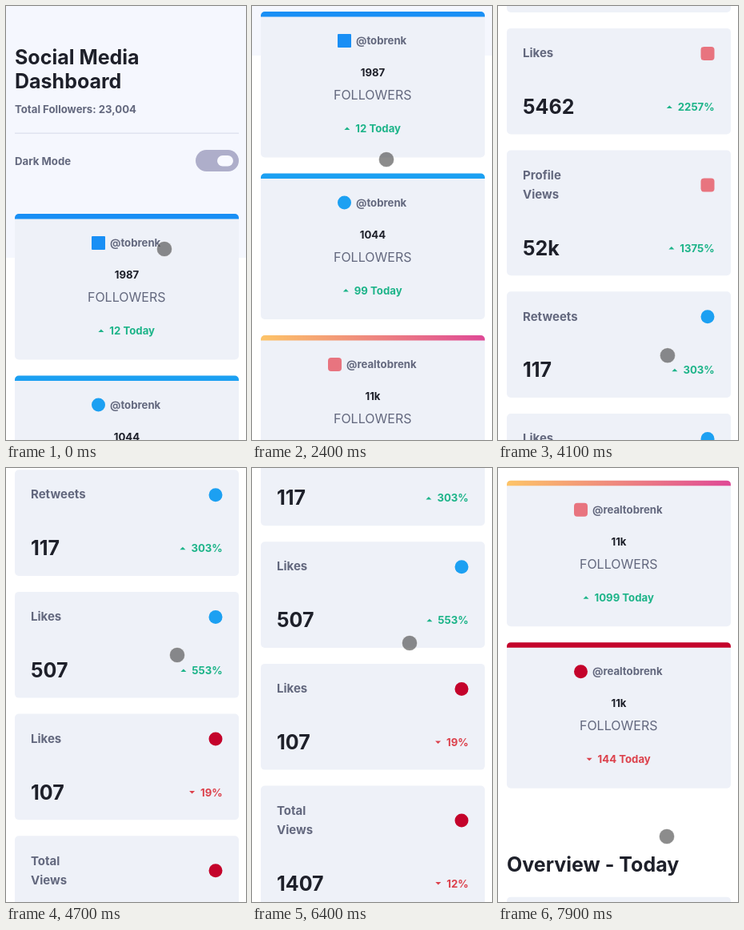
An HTML page for the animation above (8000 ms loop, 300 by 543 pixels).

```html
<!DOCTYPE html>
<html lang="en">
<head>
<meta charset="utf-8">
<title>Social Media Dashboard</title>
<style>
  html, body { margin: 0; width: 100%; height: 100%; overflow: hidden; background: #fff; }
  svg { display: block; width: 300px; height: 543px; font-family: Inter, sans-serif; }
  text { font-size: 13.2px; font-weight: 700; fill: #63687e; }
  .title { font-size: 25px; fill: #1e202a; }
  .dark { fill: #1e202a; }
  .label { font-size: 15px; }
  .caption { font-size: 16px; font-weight: 400; }
  .up { fill: #1db489; }
  .down { fill: #dc414c; }
</style>
</head>
<body>
<svg viewBox="0 0 300 543">
  <defs>
    <linearGradient id="sunset">
      <stop stop-color="#fdc468"/>
      <stop offset="1" stop-color="#df4996"/>
    </linearGradient>
  </defs>
  <g id="page">
    <rect width="300" height="315" fill="#f5f7fe"/>
    <text class="title" x="11" y="73">Social Media</text>
    <text class="title" x="11" y="103">Dashboard</text>
    <text x="11" y="134">Total Followers: 23,004</text>
    <rect x="11" y="158.5" width="280" height="1.5" fill="#e0e3f0"/>
    <text x="11" y="199">Dark Mode</text>
    <rect x="237" y="180" width="54" height="27" rx="13.5" fill="#aeaeca"/>
    <rect x="264" y="187" width="20" height="13.5" rx="6.75" fill="#f8f9ff"/>
    <text class="title" x="11" y="1154">Overview - Today</text>
  </g>
  <circle id="cursor" r="9.6" fill="rgba(80,80,80,.66)" stroke="rgba(255,255,255,.5)"/>
</svg>
<script>
(() => {
  const page = document.getElementById('page');
  const cursor = document.getElementById('cursor');

  function add(tag, attrs, content = '') {
    const node = document.createElementNS('http://www.w3.org/2000/svg', tag);
    for (const key in attrs) node.setAttribute(key, attrs[key]);
    node.textContent = content;
    page.append(node);
    return node;
  }

  const write = (content, x, y, cls = '', anchor = 'start') =>
    add('text', { x, y, class: cls, 'text-anchor': anchor }, content);

  const networks = {
    blue: { color: '#198ff5', round: 1 },
    sky: { color: '#1ca0f2', round: 8.5 },
    pink: { color: '#e8747f', bar: 'url(#sunset)', round: 4 },
    red: { color: '#c4032b', round: 8.5 }
  };

  function badge(network, cx, cy) {
    const { color, round } = networks[network];
    add('rect', { x: cx - 8.5, y: cy - 8.5, width: 17, height: 17, rx: round, fill: color });
  }

  const panel = (y, height) =>
    add('rect', { x: 11, y, width: 280, height, rx: 5, fill: '#eef1f8' });

  // Text with a small triangle on its left; align 0.5 centres the pair on x, 1 ends it there.
  function trend(content, direction, x, y, align) {
    const gap = 14;
    const label = write(content, 0, y, direction);
    const left = x - (label.getComputedTextLength() + gap) * align;
    label.setAttribute('x', left + gap);
    const shape = direction === 'up' ? `M${left} ${y - 3}h7l-3.5 -3.5z` : `M${left} ${y - 6.5}h7l-3.5 3.5z`;
    add('path', { d: shape, class: direction });
  }

  function followerCard(y, network, handle, count, change, direction) {
    const left = handle.length > 8 ? 118 : 130;
    const { color, bar = color } = networks[network];
    panel(y, 182.5);
    add('path', { d: `M11 ${y + 6.5}v-1.5a5 5 0 0 1 5 -5h270a5 5 0 0 1 5 5v1.5z`, fill: bar });
    badge(network, left - 14.5, y + 36.5);
    write(handle, left, y + 41);
    write(count, 151, y + 81, 'dark', 'middle');
    write('FOLLOWERS', 150.7, y + 110, 'caption', 'middle');
    trend(change, direction, 150.7, y + 151, 0.5);
  }

  // Returns the card's height: each further word of the name takes one more line.
  function overviewCard(y, name, network, count, change, direction) {
    const lines = name.split(' ');
    const extra = (lines.length - 1) * 24;
    panel(y, 132.7 + extra);
    lines.forEach((line, i) => write(line, 31, y + 36.3 + i * 24, 'label'));
    badge(network, 262, y + 31.5 + extra / 2);
    write(count, 31, y + 107 + extra, 'title');
    trend(change, direction, 270.7, y + 103 + extra, 1);
    return 132.7 + extra;
  }

  [
    ['blue', '@tobrenk', '1987', '12 Today', 'up'],
    ['sky', '@tobrenk', '1044', '99 Today', 'up'],
    ['pink', '@realtobrenk', '11k', '1099 Today', 'up'],
    ['red', '@realtobrenk', '11k', '144 Today', 'down']
  ].forEach((card, i) => followerCard(260 + i * 202.5, ...card));

  [
    ['Page Views', 'blue', '87', '3%', 'up'],
    ['Likes', 'blue', '52', '2%', 'down'],
    ['Likes', 'pink', '5462', '2257%', 'up'],
    ['Profile Views', 'pink', '52k', '1375%', 'up'],
    ['Retweets', 'sky', '117', '303%', 'up'],
    ['Likes', 'sky', '507', '553%', 'up'],
    ['Likes', 'red', '107', '19%', 'down'],
    ['Total Views', 'red', '1407', '12%', 'down']
  ].reduce((y, card) => y + overviewCard(y, ...card) + 20, 1186);

  // A swipe drags the page from one point to another; after release the page glides on.
  const swipe = (press, release, from, to, glide) => ({ press, release, from, to, glide });
  const rest = { release: 200, to: [198, 304] };
  const swipes = [
    swipe(1800, 2400, [156, 467], [168, 192], 209),
    swipe(3100, 3600, [196, 440], [210, 215], 1010),
    swipe(4250, 4700, [212, 440], [214, 234], 37),
    swipe(6400, 6700, [197, 219], [205, 440], -856),
    swipe(7450, 7900, [200, 230], [211, 461], -150)
  ];
  const dragRatio = 0.92, glideTime = 300;

  const progress = (t, from, to) => Math.min(1, Math.max(0, (t - from) / (to - from)));
  const smooth = p => p * p * (3 - 2 * p);
  const settle = p => 1 - (1 - p) ** 3;
  const mix = (a, b, p) => a.map((value, i) => value + (b[i] - value) * p);

  function scrollAt(t) {
    return swipes.reduce((sum, { press, release, from, to, glide }) => {
      const drag = (from[1] - to[1]) * dragRatio * smooth(progress(t, press, release));
      const glided = 1 - Math.exp(-Math.max(0, t - release) / glideTime);
      return sum + drag + glide * glided;
    }, 0);
  }

  function cursorAt(t) {
    const next = swipes.findIndex(({ release }) => t < release);
    if (next < 0) return swipes[swipes.length - 1].to;
    const { press, release, from, to } = swipes[next];
    if (t >= press) return mix(from, to, smooth(progress(t, press, release)));
    const last = swipes[next - 1] || rest;
    return mix(last.to, from, settle(progress(t, last.release, press)));
  }

  const start = performance.now();
  const loop = 8000, step = 100;

  function draw() {
    const elapsed = (performance.now() - start) % loop;
    const t = Math.floor(elapsed / step) * step;
    const [x, y] = cursorAt(t);
    page.setAttribute('transform', `translate(0 ${-scrollAt(t)})`);
    cursor.setAttribute('cx', x);
    cursor.setAttribute('cy', y);
    requestAnimationFrame(draw);
  }
  draw();
})();
</script>
</body>
</html>
```
